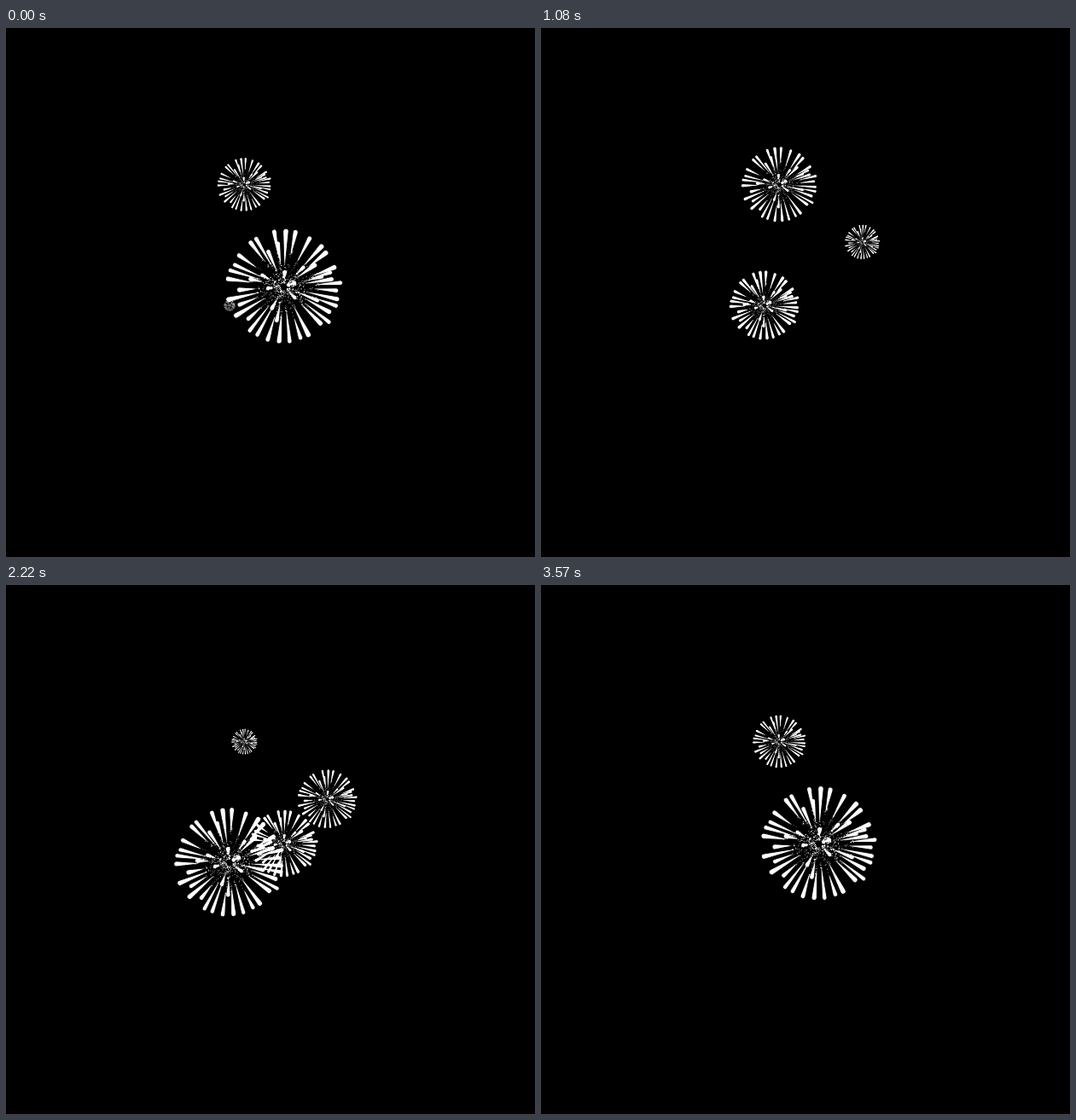
Write an HTML page with a canvas that moves like this. It is 620 by 620 pixels and loops after 3.6 s.

```html
<!DOCTYPE html>
<html lang="en">
<head>
<meta charset="utf-8">
<title>Fireworks</title>
<style>
  html, body { margin: 0; width: 100%; height: 100%; overflow: hidden; background: #000; }
  canvas { display: block; width: 620px; height: 620px; }
</style>
</head>
<body>
<canvas id="stage" width="620" height="620"></canvas>
<script>
const SIZE = 620, LOOP = 3600, STEP = 30;
const BURST = 90, FADE = 3000, END = 3180;
const ctx = document.getElementById('stage').getContext('2d');

let seed = 11;
function rand() {
  seed = (seed * 16807) % 2147483647;
  return seed / 2147483647;
}

// angle in degrees (counter-clockwise from the right), reach in percent
const RAYS = [
  [88, 99], [78, 99], [62, 97], [47, 98], [39, 96], [45, 50], [35, 68], [21, 96],
  [17, 86], [4, 100], [9, 86], [15, 70], [20, 22], [-4, 93], [-13, 97], [-20, 98],
  [-22, 65], [-29, 92], [-38, 101], [-45, 92], [-45, 29], [-63, 96], [-72, 95],
  [-84, 97], [-95, 97], [-107, 98], [-119, 97], [-128, 98], [-102, 62], [-119, 45],
  [-138, 85], [-149, 99], [-158, 85], [-167, 101], [-176, 80], [172, 100], [163, 99],
  [156, 95], [145, 97], [167, 62], [152, 45], [-175, 30], [127, 98], [120, 98],
  [114, 69], [98, 78], [100, 99], [87, 28]
].map(([deg, reach]) => {
  const tip = reach / 100;
  const tail = tip * (0.38 + 0.24 * rand());
  const dots = Array.from({ length: 15 }, () => [
    0.06 + (tail * 1.15 - 0.06) * rand(),
    (rand() - 0.5) * 0.045,
    0.3 + 0.6 * rand()
  ]);
  return { angle: -deg * Math.PI / 180, tip, tail, dots, fat: 0.82 + 0.4 * rand() };
});

const SHOWS = [
  { x: 262, y: 325.3, scale: 1, turn: -9.5, start: 3570 },
  { x: 325.7, y: 303.3, scale: 1, turn: 0, start: 1170 },
  { x: 279.5, y: 183.7, scale: 0.58, turn: -9.5, start: 1830 },
  { x: 376.7, y: 251, scale: 0.61, turn: 0, start: 330 }
];

// quick pop, then steady growth
function radiusAt(age) {
  const grow = a => 18.3 + 0.0206 * a;
  return age < BURST ? grow(BURST) * age / BURST : grow(age);
}

function drawShow(show, time) {
  const age = (time - show.start + LOOP) % LOOP;
  if (age <= 0 || age >= END) return;

  const full = radiusAt(age);
  const r = full * show.scale;
  const extra = 0.7 * show.scale ** 2 * Math.min(1, full / 20) ** 2;
  const alpha = Math.min(1, (END - age) / (END - FADE));

  ctx.save();
  ctx.translate(show.x, show.y);
  ctx.rotate(show.turn * Math.PI / 180);

  const path = new Path2D();
  for (const ray of RAYS) {
    const half = (r * 0.055 * ray.fat + extra) / 2;
    const c = Math.cos(ray.angle), s = Math.sin(ray.angle);
    const at = (u, v) => [u * c - v * s, u * s + v * c];
    const head = r * ray.tip - half;
    path.moveTo(...at(r * ray.tail, 0));
    path.lineTo(...at(head, -half));
    path.arc(...at(head, 0), half, ray.angle - Math.PI / 2, ray.angle + Math.PI / 2);
    path.closePath();

    const dot = Math.min(1, r * 0.014);
    for (const [u, v, light] of ray.dots) {
      const [x, y] = at(u * r, v * r);
      ctx.globalAlpha = alpha * light;
      ctx.fillRect(x - dot / 2, y - dot / 2, dot, dot);
    }
  }

  ctx.globalAlpha = alpha * 0.2;
  ctx.lineWidth = r * 0.022;
  ctx.stroke(path);
  ctx.globalAlpha = alpha;
  ctx.fill(path);
  ctx.restore();
}

function render(time) {
  ctx.globalCompositeOperation = 'source-over';
  ctx.globalAlpha = 1;
  ctx.fillStyle = '#000';
  ctx.fillRect(0, 0, SIZE, SIZE);
  ctx.fillStyle = '#060003';
  ctx.fillRect(0, 616, SIZE, 4);
  ctx.globalCompositeOperation = 'lighter';
  ctx.fillStyle = ctx.strokeStyle = '#fff';
  for (const show of SHOWS) drawShow(show, time);
}

const begin = performance.now();
function tick() {
  const time = (performance.now() - begin) % LOOP;
  render(Math.floor(time / STEP) * STEP);
  requestAnimationFrame(tick);
}
tick();
</script>
</body>
</html>
```
